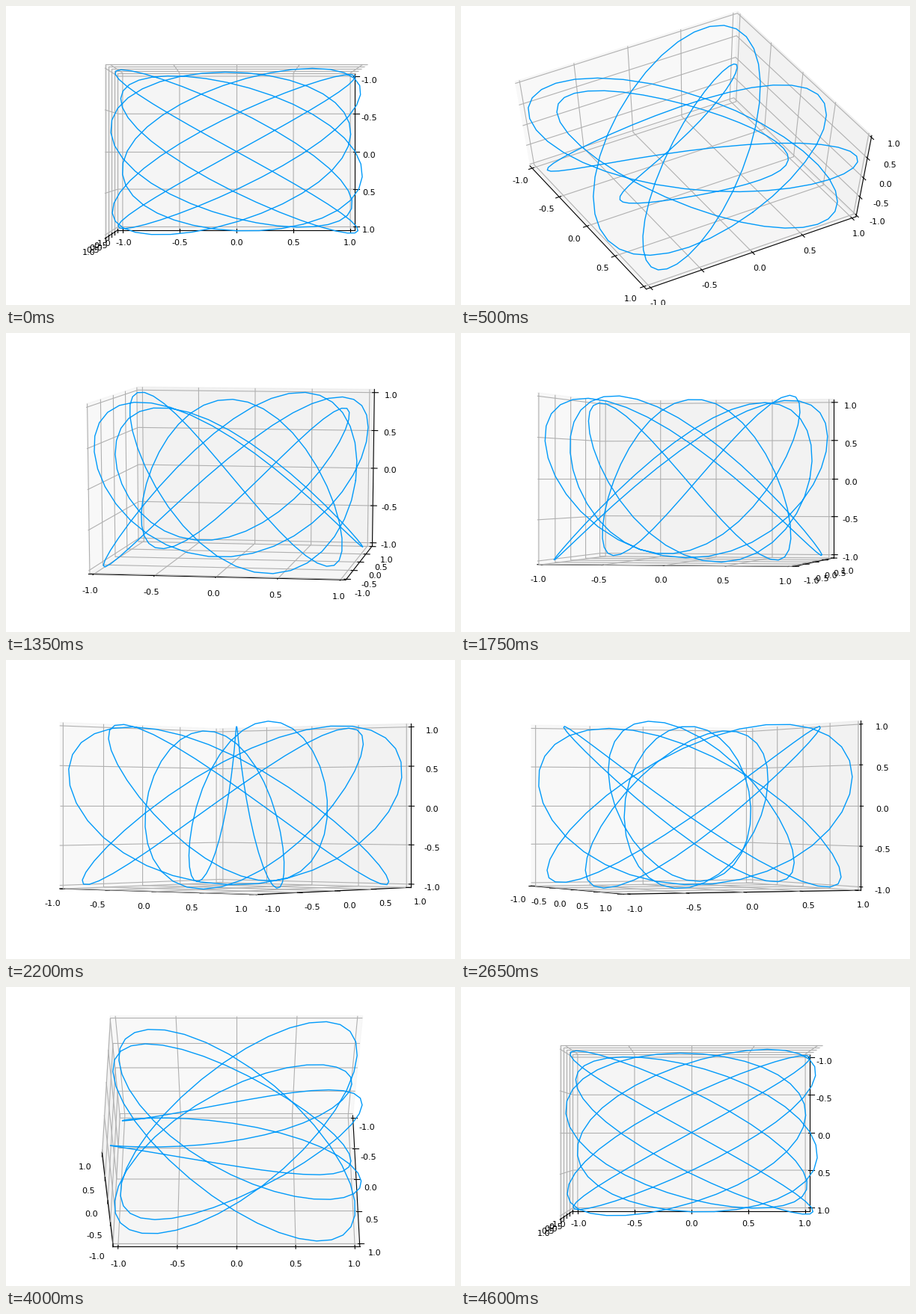
A matplotlib script that plays this animation: 600x400 px, repeating every 4.65 s.

```python
import numpy as np
import matplotlib.pyplot as plt
from matplotlib.animation import FuncAnimation
from matplotlib.collections import LineCollection
from matplotlib.patches import Polygon

W, H, DPI = 600, 400, 100
STEPS = 30                      # 3 degree steps per camera move
DIST = 10                       # camera distance in box widths
DELTA = 1 / 6
EDGE = 1 + DELTA / 4            # panes lie slightly outside the limits
TICKS = np.linspace(-1, 1, 5)
PANE_GREYS = (0.95, 0.9, 0.925)
TICK_DIR = (1, 0, 0)            # direction in which each axis' ticks point
EDGE_FLIPS = ((1, 0), (0, 1), (0, 2))

t = np.linspace(0, 2 * np.pi, 200)
CURVE = np.column_stack([np.cos(5 * t), np.sin(6 * t), np.sin(7 * t)])

MARGIN = DPI / 25.4             # one millimetre
ax_w, ax_h = W - 2 * MARGIN, H - 2 * MARGIN
LABEL_GAP = 11.5 * 48 * DPI / (72 * (ax_w + ax_h)) * DELTA

plt.rcParams["font.family"] = "DejaVu Sans"
fig = plt.figure(figsize=(W / DPI, H / DPI), dpi=DPI, facecolor="white")
ax = fig.add_axes([MARGIN / W, MARGIN / H, ax_w / W, ax_h / H])
ax.set_xlim(-0.95 / DIST, 0.9 / DIST)
ax.set_ylim(-0.95 / DIST, 0.9 / DIST)
ax.axis("off")


def add_pane(grey):
    pane = Polygon(np.zeros((4, 2)), closed=False, color=(grey,) * 3,
                   alpha=0.5, lw=1, zorder=1, clip_on=False)
    return ax.add_patch(pane)


def add_line(z, **style):
    return ax.plot([], [], zorder=z, clip_on=False, **style)[0]


class AxisArt:
    """Artists of one box axis: pane, line, grid, ticks and labels."""

    def __init__(self, i):
        self.i = i
        z = 2 + i
        self.pane = add_pane(PANE_GREYS[i])
        self.line = add_line(z, color="k", lw=0.8)
        self.grid = LineCollection([], colors="#b0b0b0", linewidths=0.8,
                                   zorder=z + 0.1, clip_on=False)
        ax.add_collection(self.grid, autolim=False)
        self.ticks = [add_line(z + 0.2, color="k", lw=0.8) for _ in TICKS]
        self.labels = [ax.text(0, 0, f"{v:.1f}", fontsize=8, ha="center",
                               va="top", zorder=z + 0.3) for v in TICKS]

    def update(self, back, project):
        """back holds the coordinate of the rear pane on each axis."""
        i = self.i
        a, b = [k for k in range(3) if k != i]
        corners = np.tile(back, (4, 1))
        corners[:, a] = np.array([-1, 1, 1, -1]) * EDGE
        corners[:, b] = np.array([-1, -1, 1, 1]) * EDGE
        self.pane.set_xy(project(corners))

        start = back.copy()
        start[EDGE_FLIPS[i][0]] *= -1
        end = start.copy()
        end[EDGE_FLIPS[i][1]] *= -1
        self.line.set_data(*project(np.array([start, end])).T)

        side = TICK_DIR[i]
        sign = np.sign(back[side])
        segments = []
        for v, tick, label in zip(TICKS, self.ticks, self.labels):
            path = np.tile(back, (3, 1))
            path[:, i] = v
            path[0, (i + 1) % 3] *= -1
            path[2, (i + 2) % 3] *= -1
            segments.append(project(path))

            mark = np.tile(start, (2, 1))
            mark[:, i] = v
            mark[:, side] += sign * DELTA * np.array([0.1, -0.2])
            tick.set_data(*project(mark).T)

            spot = start + np.sign(start) * LABEL_GAP
            spot[i] = v
            label.set_position(project(spot))
        self.grid.set_segments(segments)


def camera(frame):
    """Azimuth and elevation: dive to the side, orbit, climb back on top."""
    move, k = divmod(frame, STEPS + 1)
    turn = 90 * k / STEPS
    return ((-turn, 90 - turn), (turn - 90, 0), (0, turn))[move]


def projector(azim, elev):
    ca, sa = np.cos(azim), np.sin(azim)
    ce, se = np.cos(elev), np.sin(elev)
    toward = np.array([ca * ce, sa * ce, se])
    screen = np.array([[-sa, ca, 0], [-se * ca, -se * sa, ce]])

    def project(points):
        p = np.asarray(points) / 2
        depth = DIST - p @ toward
        return p @ screen.T / depth[..., None]

    return project, toward


axes_art = [AxisArt(i) for i in range(3)]
curve = add_line(10, color="#009afa", lw=1)


def draw(frame):
    project, toward = projector(*np.radians(camera(frame)))
    back = np.where(toward < -1e-9, EDGE, -EDGE)
    for art in axes_art:
        art.update(back, project)
    curve.set_data(*project(CURVE).T)
    return []


anim = FuncAnimation(fig, draw, frames=3 * (STEPS + 1), interval=50,
                     init_func=lambda: [], repeat=True, repeat_delay=0)
plt.show()
```
